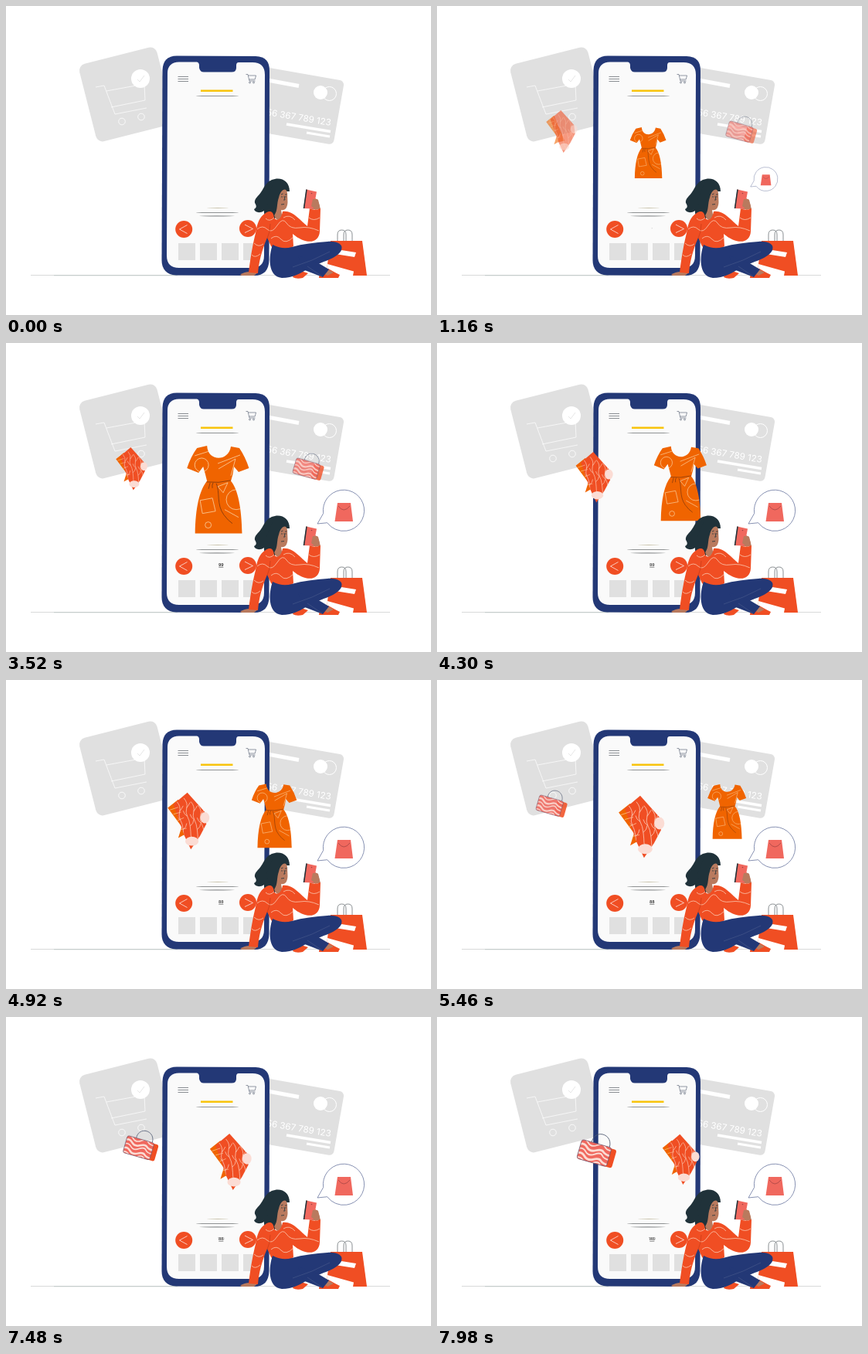
An HTML page with a canvas that plays this animation: 550x400 px, repeating every 8000 ms.

```html
<!DOCTYPE html>
<html lang="en">
<head>
<meta charset="utf-8">
<title>Fashion shop</title>
<style>
  html, body { margin: 0; width: 100%; height: 100%; overflow: hidden; background: #fff; }
  canvas { display: block; width: 550px; height: 400px; }
</style>
</head>
<body>
<canvas id="stage"></canvas>
<script>
const canvas = document.getElementById('stage');
const ctx = canvas.getContext('2d');
const ratio = window.devicePixelRatio || 1;
canvas.width = 550 * ratio;
canvas.height = 400 * ratio;

const NAVY = '#233876', RED = '#f04e23', CORAL = '#f0685e', GREY = '#e0e0e0';
const HAIR = '#20323a', SKIN = '#b97a5e', ORANGE = '#f06400', CREAM = '#fcd3a6', BLUSH = '#fbdcd4';
const LOOP = 8000, MOVE = 2000;

const clamp = v => Math.max(0, Math.min(1, v));
const mix = (a, b, p) => a + (b - a) * p;
const mixPose = (a, b, p) => a.map((v, i) => mix(v, b[i], p));

function fill(d, color) {
  ctx.fillStyle = color;
  ctx.fill(new Path2D(d));
}
function line(d, color, width = 0.8) {
  ctx.strokeStyle = color;
  ctx.lineWidth = width;
  ctx.stroke(new Path2D(d));
}
function disc(x, y, rx, color, ry = rx) {
  ctx.beginPath();
  ctx.ellipse(x, y, rx, ry, 0, 0, 7);
  ctx.fillStyle = color;
  ctx.fill();
}
function ring(x, y, r, color, width = 0.8) {
  ctx.beginPath();
  ctx.arc(x, y, r, 0, 7);
  ctx.strokeStyle = color;
  ctx.lineWidth = width;
  ctx.stroke();
}
function box(x, y, w, h, r, color) {
  ctx.beginPath();
  ctx.roundRect(x, y, w, h, r);
  ctx.fillStyle = color;
  ctx.fill();
}
function within(setup, draw) {
  ctx.save();
  setup();
  draw();
  ctx.restore();
}
// Draws a piece whose own middle is (cx, cy) at the pose [x, y, scale].
function place(draw, cx, cy, [x, y, scale], alpha = 1) {
  if (alpha <= 0 || scale <= 0) return;
  within(() => {
    ctx.globalAlpha = alpha;
    ctx.translate(x, y);
    ctx.scale(scale, scale);
    ctx.translate(-cx, -cy);
  }, draw);
}

function drawCards() {
  within(() => { ctx.translate(93, 77); ctx.rotate(-0.249); },
    () => box(0, 0, 103.5, 103.5, 9, GREY));
  line('M116 105L127 103L141 140L182 132M130 110L179 101L180 122L136 131', '#fff', 0.7);
  ring(150, 149.5, 4.3, '#fff');
  ring(175, 143.5, 4.3, '#fff');
  disc(174, 94, 12, '#fff');
  line('M170 95L173 98L179 90', GREY);

  within(() => { ctx.translate(438, 97); ctx.rotate(0.174); },
    () => box(-122, 0, 122, 84, 6, GREY));
  line('M336 95.5L379 103.5', '#fff', 5);
  disc(407, 112, 9, '#fff');
  ring(418.5, 113.5, 9, '#fff', 1);
  within(() => { ctx.translate(420, 155); ctx.rotate(0.165); }, () => {
    ctx.fillStyle = '#fff';
    ctx.font = '11.6px Inter, sans-serif';
    ctx.textAlign = 'right';
    ctx.fillText('56 367 789 123', 0, 0);
  });
  line('M363 153L420 162.5', '#fff', 3.5);
  line('M389 164L419 169', '#fff', 3);
}

function drawPhone() {
  line('M32 348.5H497', '#d4d6d6', 0.9);
  line('M62 348.8H222', '#b4bfbd', 0.7);
  fill('M221 64.5L323 65C336 65.5 341 72 341 84L340.5 329C340 342 334 349 321 349L220 348.5C208 348 201.5 341 201.5 329L202.5 83C203 71 209 64.5 221 64.5Z', NAVY);
  fill('M224 72.5H247Q250 73 250 77V80Q251 85.5 256 85.5H292Q298 85.5 298 80V77Q298 73 301 73H319Q335 73 335 89L334 323Q334 339 318 339H224Q208 339 208 323L209 87Q209 73 224 72.5Z', '#fafafa');
  line('M222.5 91.5H236M222.5 94.5H236M222.5 97.5H236', '#6b7076');
  line('M310.5 88.5H313L315 97H322.5M313.3 90H323.5L322.2 95H314.5', '#656d7e', 0.7);
  ring(315.5, 99, 1, '#656d7e', 0.7);
  ring(320.5, 99, 1, '#656d7e', 0.7);
  line('M252 109.8H293.5', '#f8c40c', 2.5);
  // Thin strokes taper at both ends.
  disc(273.5, 116.5, 28, '#8f9293', 0.6);
  disc(273.5, 267.5, 28, '#8f9293', 0.6);
  disc(273, 271.8, 23, '#8f9293', 0.6);
  disc(274, 261.5, 14, '#c9c3ab', 0.5);
  disc(230.2, 289, 11, RED);
  disc(313, 288, 11, RED);
  line('M234.5 283.5L224.5 289L234.5 294.5M309 283L319.5 288.5L309 293.5', '#fff', 0.7);
  for (let i = 0; i < 4; i++) box(223 + 28 * i, 307, i < 3 ? 22 : 19, 22, 0, GREY);
}

function drawShoppingBag() {
  line('M429 305V296Q429 290 434.5 290Q440 290 440 296V305M437 305V296Q437 290 442.5 290Q448 290 448 296V305', '#6c7376', 0.8);
  fill('M420 304H461L467 349H414Z', RED);
  fill('M434 316L453 319L451 325L426 321Z', '#fff');
  fill('M416 334L450 343.5L449 349H414Z', '#fff');
}

function drawWoman() {
  // Head
  fill('M348 224C358 222 367 228 367 240L352 240C349 247 349 252 351 258C354 267 350 275 345 277C338 275 333 269 334 265C328 269 322 267 321 263C325 261 324 258 322 255C321 249 327 246 330 241C334 236 336 226 348 224Z', HAIR);
  fill('M352 237C358 235 363 236 364 242L364.5 254C364 262 361 265 356 264L358 276C352 279 347 276 347 268L350 253Z', SKIN);
  fill('M347 226C357 222 367 229 365 239C359 235 355 240 353 248C350 256 352 265 347 271L336 254Z', HAIR);
  line('M356 244L358.5 243M361 244L363.5 244M360 246L361 251L359 251M356 257L360 256.5', HAIR, 0.8);
  disc(357, 247, 0.7, HAIR);
  disc(362, 247, 0.7, HAIR);

  // Hand with phone
  fill('M395 263L393 255L398 248L404 251L407 263Z', SKIN);
  fill('M388.5 237.5L402 240.5L398 262.5L385 262Z', CORAL);
  line('M389 237.5L385.5 262', HAIR, 1.6);
  disc(395.5, 242.5, 0.8, '#9b4141');
  fill('M395 259L397 250L403 250L406 259L401 264Z', SKIN);

  // Supporting hand
  fill('M303 348Q308 344 316 344L326 345L321 349H305Z', SKIN);

  // Sweater
  fill('M336 268C342 264 346 266 347 274C350 279 356 277 358 266C371 264 381 278 390 285L393 262Q400 265 407 262L406 292C405 307 389 310 371 295L372 311C365 317 349 316 343 311L338 300C331 316 327 332 326 346L314 345C317 320 320 306 323 294C325 281 328 273 336 268Z', RED);
  line('M325 289Q332 283 338 289T351 284T363 281T380 287T405 291M318 322Q322 327 329 321M321 307Q327 313 333 308M343 301Q350 295 356 302T372 299M392 274Q398 279 406 274M336 275Q341 280 347 274M359 274Q367 269 374 277', '#fbd0ba', 0.75);
  line('M338 301Q342 292 342 282', '#c63b17', 0.7);

  // Legs and shoes
  fill('M371 351Q374 344 382 343L391 346L384 352Q376 354 371 351Z', RED);
  fill('M406 343L417 340L426 345L432 348L430 352H405Z', RED);
  fill('M409 345L417 341L424 345L416 349Z', SKIN);
  fill('M345 309C355 314 362 314 370 312C384 308 400 306 416 305C428 304 437 308 434 316C429 327 409 331 394 338C382 346 371 352 357 352C338 350 340 323 345 309Z', NAVY);
  fill('M378 323L403 332L418 341L410 351L384 341Z', NAVY);
  line('M371 338Q397 330 419 318M390 337L409 350', '#536290', 0.5);
}

function drawBubble() {
  ctx.beginPath();
  ctx.arc(437, 216.8, 26.6, 3, 2.5 + Math.PI * 2);
  ctx.lineTo(403, 234);
  ctx.closePath();
  ctx.fillStyle = '#fff';
  ctx.fill();
  ctx.strokeStyle = '#5f6c98';
  ctx.lineWidth = 0.75;
  ctx.stroke();
  fill('M429 207H446L449 231H425.5Z', CORAL);
  line('M430 211Q437 221 445 211', '#9b4141', 0.7);
}

const DRESS = 'M246 136L259 133C260 154 287 154 290 134L301 136Q309 148 313.5 162L300 167L294 160Q293 170 290 179C299 189 304 214 304.5 247H243.5C244 214 249 191 259 179Q257 170 254 160L248 168L233 162Q238 147 246 136Z';
function drawDress() {
  fill(DRESS, ORANGE);
  within(() => ctx.clip(new Path2D(DRESS)), () => {
    line('M243 146L262 140M273 156L302 145M274 163L296 150L290 172M250 204L266 201L270 218L253 221ZM273 186L286 181L280 194ZM282 216L300 226', CREAM, 0.8);
    ring(252, 158, 9, CREAM, 0.8);
    ring(297, 203, 13, CREAM, 0.8);
    ring(260.5, 236, 4, CREAM, 0.8);
    line('M258 180Q274 182 290 178M263 181L261 189M267 181Q265 184 266 188M271 182C276 192 271 210 281 223Q286 230 292 234', '#793510', 0.8);
  });
}

const SCARF = 'M265 150L290 178L292 195L283 212L270 231L261 212L245 167Z';
function drawScarf() {
  fill('M237 172L252 160L272 208L259 211L252 215L257 199Z', ORANGE);
  fill(SCARF, RED);
  line('M240 175L252 171M245 181L256 178M251 190L260 186M255 203L264 201', CREAM, 0.7);
  within(() => ctx.clip(new Path2D(SCARF)), () => {
    for (let i = 0; i < 4; i++) {
      const x = 250 + i * 10, y = 158 + Math.abs(i - 1) * 5;
      line(`M${x} ${y}q6 7 4 14t1 12t4 14t1 13t5 13M${x + 4} ${y + 14}q3 -4 5 -8M${x + 5} ${y + 26}q-5 -3 -6 -8M${x + 9} ${y + 40}q5 -4 5 -9`, '#fcd0bd', 0.8);
    }
  });
  disc(290, 186, 6.5, BLUSH, 8);
  disc(271.5, 219.5, 9.5, BLUSH, 6.5);
}

function drawHandbag() {
  const front = new Path2D();
  front.roundRect(-22, -10, 40, 25.5, 3);
  within(() => ctx.rotate(0.28), () => {
    line('M-9 -10C-10 -28 15 -28 15 -10', '#4d5870', 0.8);
    box(8, -9, 17, 24.5, 3, RED);
    ctx.fillStyle = CORAL;
    ctx.fill(front);
    within(() => ctx.clip(front), () => {
      for (let i = 0; i < 5; i++)
        line(`M-24 ${i * 6 - 9}q6 -4 11 1t12 ${i % 2}t10 -1t12 3`, BLUSH, 1.8 + i % 2);
    });
    ctx.strokeStyle = '#6b536b';
    ctx.lineWidth = 0.7;
    ctx.stroke(front);
  });
}

function drawPrice(text, alpha, scale = 1) {
  place(() => {
    ctx.fillStyle = '#333';
    ctx.font = 'bold 5.2px Inter, sans-serif';
    ctx.textAlign = 'center';
    ctx.fillText(text, 0, 2);
    ctx.fillRect(-3, 2.6, 6, 0.6);
  }, 0, 0, [278.3, 287.3, scale], alpha);
}

const POSES = {
  dress: [[273, 190, 1], [377, 170, 0.614], [161, 170, 0.614]],
  scarf: [[162, 162.5, 0.68], [267.5, 190.5, 1], [367, 178, 0.6]],
  bag: [[393.5, 161, 0.8], [143, 161, 0.8], [271.6, 187.5, 1.21]]
};
const PRICES = ['99', '88', '149'];

function render(t) {
  const intro = t < 60 ? 0 : clamp(t / MOVE);
  const first = clamp((t - 3500) / MOVE);
  const second = clamp((t - 7000) / MOVE);
  const step = second > 0 ? 1 : 0;
  const p = step ? second : first;
  const pose = name => mixPose(POSES[name][step], POSES[name][step + 1], p);
  // The piece travelling behind the phone vanishes on one side and returns on the other.
  const wrap = p === 0 || p === 1 ? 1 : Math.max(clamp(1 - p * 20), clamp((p - 0.85) / 0.15));

  ctx.setTransform(ratio, 0, 0, ratio, 0, 0);
  ctx.fillStyle = '#fff';
  ctx.fillRect(0, 0, 550, 400);
  drawCards();
  if (!step) place(drawHandbag, 0, 0, pose('bag'), intro * wrap);
  drawPhone();

  const [x, y, scale] = pose('dress');
  place(drawDress, 273, 190, [x, y, scale * intro], step ? wrap : 1);
  place(drawScarf, 267.5, 190.5, pose('scarf'), intro);
  if (step) place(drawHandbag, 0, 0, pose('bag'));

  const shown = clamp((t - 880) / 1120);
  drawPrice(PRICES[step], shown * (1 - p), shown);
  drawPrice(PRICES[step + 1], p);
  drawShoppingBag();
  drawWoman();
  place(drawBubble, 409.5, 234, [409.5, 234, intro]);
}

const start = performance.now();
function tick() {
  render((performance.now() - start) % LOOP);
  requestAnimationFrame(tick);
}
tick();
</script>
</body>
</html>
```
